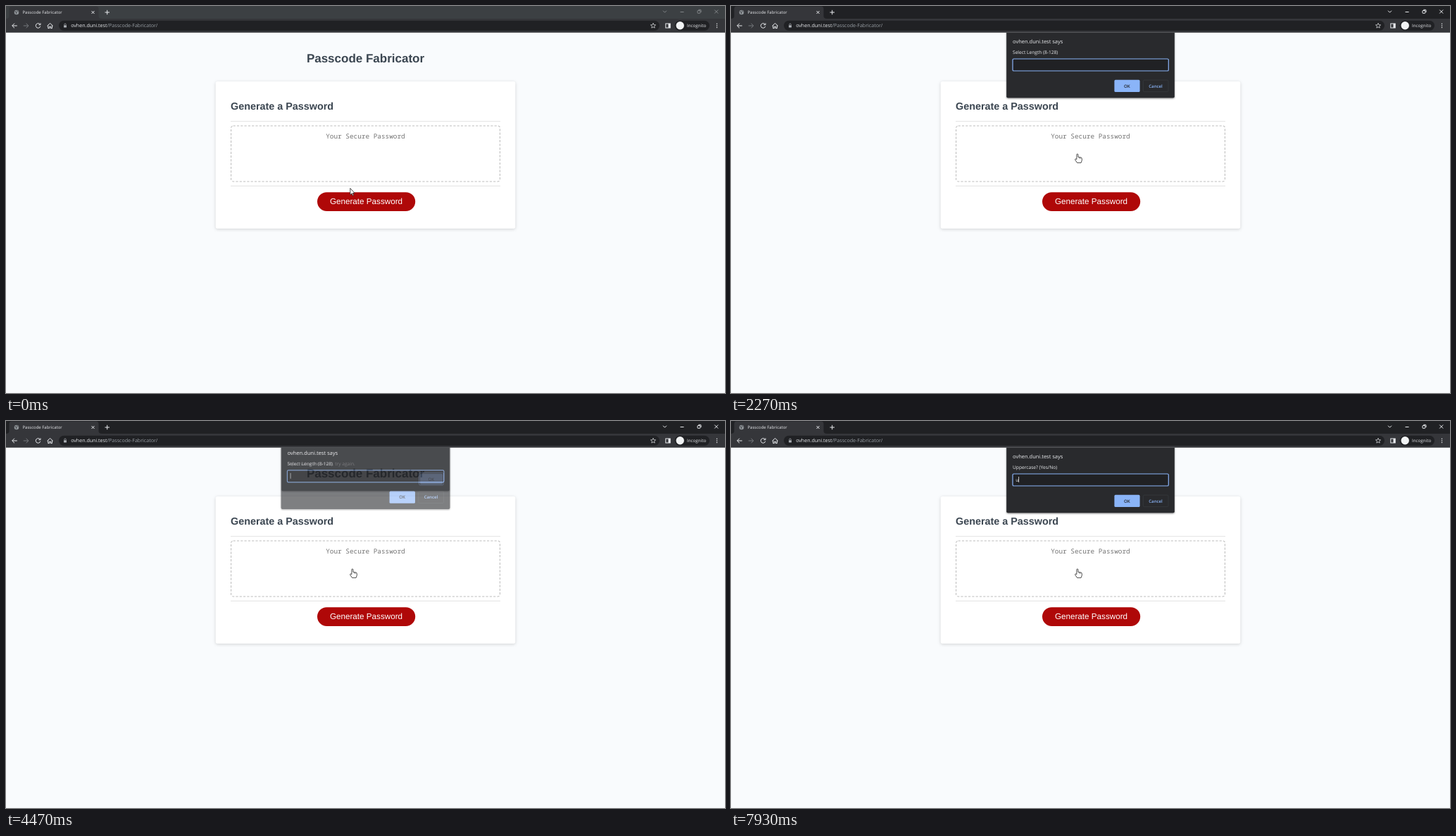
Write an HTML page that moves like this. It is 1021x549 px and loops after 8 s.

```html
<!DOCTYPE html>
<html lang="en">
<head>
<meta charset="utf-8">
<title>Passcode Fabricator</title>
<style>
  html, body { margin: 0; width: 100%; height: 100%; overflow: hidden; background: #f9fbfd; }
  svg { display: block; width: 100vw; height: 100vh; }
  text { text-rendering: geometricPrecision; white-space: pre; }
  .ui { font-family: "Open Sans", "Noto Sans", sans-serif; fill: #e8eaed; }
  .page { font-family: "Liberation Sans", Arial, sans-serif; fill: #3b4651; }
  .bold { font-weight: 700; }
  .semi { font-weight: 600; }
  .mid { text-anchor: middle; }
  .mono { font: 9.38px "Noto Sans Mono", "DejaVu Sans Mono", monospace; fill: #757575; }
  .icon { fill: none; stroke: #e8eaed; stroke-width: 1; }
  .card { filter: drop-shadow(0 1px 2px rgba(0, 0, 0, .17)); }
  .panel { filter: drop-shadow(0 1px 1px rgba(0, 0, 0, .5)); }
</style>
</head>
<body>
<svg viewBox="0 0 1021 549" preserveAspectRatio="none">
  <defs>
    <clipPath id="below"><rect y="37.7" width="1021" height="512"/></clipPath>
  </defs>
  <rect width="1021" height="549" fill="#f9fbfd"/>

  <g id="content">
    <text class="page bold mid" x="510.5" y="80" font-size="17">Passcode Fabricator</text>
    <rect class="card" x="297.7" y="107" width="425.6" height="208.7" rx="2.6" fill="#fff"/>
    <text class="page bold" x="319" y="147" font-size="14.36">Generate a Password</text>
    <path d="M319 163.7H702M319 255.3H702" stroke="#e2e2e2"/>
    <rect x="319.6" y="170" width="381.8" height="79" rx="3" fill="none"
      stroke="#bdbdbd" stroke-width="1.06" stroke-dasharray="3.2 2.1"/>
    <text class="mono mid" x="510.5" y="188.2">Your Secure Password</text>
    <rect x="442" y="264.2" width="139.2" height="26.8" rx="13.4" fill="#af0808"/>
    <text class="page mid" x="511.5" y="281.3" font-size="11.68" style="fill:#fff">Generate Password</text>
  </g>

  <g id="browser">
    <rect id="frame" width="1021" height="19"/>
    <path d="M0 18Q4.500 18 4.500 14V4Q4.500 .5 8 .5H128Q131.500 .5 131.500 4V14Q131.500 18 136 18H1021V37.700H0Z" fill="#35363a"/>
    <circle cx="15" cy="9" r="3.300" fill="#8f9498"/>
    <path d="M12.600 7.600L15 8.600 14.400 11M15.500 6.300L17.600 8.400" fill="none" stroke="#35363a" stroke-width=".9"/>
    <text class="ui" x="23.500" y="11.200" font-size="6">Passcode Fabricator</text>
    <path class="icon" d="M121.500 7L125.500 11M125.500 7L121.500 11M140.500 9H147M143.700 5.800V12.200"/>
    <g id="controls" class="icon" stroke-width=".8">
      <path d="M933 6.700L935.500 9.200 938 6.700M957.500 8.500H962.500M1006.200 5.500L1011.200 10.500M1011.200 5.500L1006.200 10.500"/>
      <rect x="982" y="6.500" width="3.800" height="3.800" rx=".5"/>
      <path d="M983.300 5.300H986.200Q987 5.300 987 6.200V9"/>
    </g>
    <rect x="75" y="20.700" width="853" height="14.300" rx="7.150" fill="#202124"/>
    <g class="icon">
      <path d="M15.800 28H8.800M12 24.700L8.700 28 12 31.300"/>
      <path d="M24.800 28H31.800M28.600 24.700L31.900 28 28.600 31.300" stroke="#75787c"/>
      <path d="M48.300 26A3.300 3.300 0 1 0 48.800 28.800M49 24.400V26.700H46.500"/>
      <path d="M58.500 28.300L62.600 24.500 66.700 28.300M59.800 27.500V31.600H61.700V29.200H63.500V31.600H65.400V27.500"/>
      <path d="M82.700 27.200V26.300A1.300 1.300 0 0 1 85.300 26.300V27.200" stroke="#a9adb2" stroke-width=".7"/>
      <path d="M919 24.300L920 26.700 922.600 26.900 920.600 28.600 921.200 31.100 919 29.800 916.800 31.100 917.400 28.600 915.400 26.900 918 26.700Z" stroke-width=".7"/>
      <rect x="936.800" y="25" width="6.400" height="6"/>
    </g>
    <rect x="82" y="27.200" width="4" height="3.400" rx=".5" fill="#a9adb2"/>
    <text class="ui" x="92.200" y="30.400" font-size="7.090">ovhen.duni.test<tspan fill="#9aa0a6">/Passcode-Fabricator/</tspan></text>
    <rect x="940.500" y="25" width="2.700" height="6" fill="#e8eaed"/>
    <rect x="949.500" y="20.700" width="49.500" height="14.300" rx="7.150" fill="#202124"/>
    <circle cx="957.200" cy="27.800" r="5.700" fill="#f1f3f4"/>
    <text class="ui" x="967" y="30.200" font-size="6.250">Incognito</text>
    <path d="M1009.500 25.200V31.500" stroke="#e8eaed" stroke-width="1.500" stroke-linecap="round" stroke-dasharray="0 2.700"/>
  </g>

  <g id="dialogs" clip-path="url(#below)"></g>

  <g id="cursor" fill="#fff" stroke="#222" stroke-width=".8" stroke-linejoin="round">
    <path id="arrow" d="M0 0V9.300L2.100 7.400 3.500 10.500 4.900 9.900 3.500 6.900H6.300Z"/>
    <g id="hand">
      <path d="M-1 7.600V1Q-1 0 0 0T1 1V4.300L5 5Q6.400 5.300 6.400 6.600V9L5.200 12.500H-.4L-3.100 8.400Q-3.500 6.800 -2.300 7Z"/>
      <path d="M2.700 5V7M4.500 5.300V7" stroke-width=".5"/>
    </g>
  </g>
</svg>

<script>
const LOOP = 8000;
const TICK = 1000 / 15;
const ACTIVATE = 7;
const TEXT_X = 404.2;
const HAND_FROM = 2;

// Dialog shift and opacity, one entry per tick
const OPENING = [[-9, .12], [-5.2, .6], [-2.1, .96], [0, 1]];
const CLOSING = [[-2, .9], [-5.5, .6], [-8, .18], [-9, 0]];

// "blink" lists the ticks at which the caret toggles, starting from visible
const dialogs = [
  { open: 9, close: 47, label: 'Select Length (8-128)',
    typed: [[0, ''], [36, 'w']], blink: [17, 25, 34, 36, 44] },
  { open: 48, close: 66, label: 'input value incorrect. try again.' },
  { open: 66, close: 93, label: 'Select Length (8-128)',
    typed: [[0, ''], [79, '1'], [81, '12']], blink: [74, 79, 89] },
  { open: 93, close: Infinity, label: 'Uppercase? (Yes/No)',
    typed: [[0, ''], [119, 'u']], blink: [101, 110, 117, 119] }
];

const pointer = [
  [0, 488.8, 258.5], [1, 491, 262.5], [2, 498, 272], [3, 501.4, 276.3],
  [16, 501, 270.4], [20, 499, 260], [21, 496, 238], [22, 493, 218], [23, 491.9, 209.9]
];

const byId = id => document.getElementById(id);
const held = (steps, tick) => steps.filter(step => step[0] <= tick).pop();
const label = (cls, x, y, size, text, fill = '#e8eaed') =>
  `<text class="ui ${cls}" x="${x}" y="${y}" font-size="${size}" style="fill:${fill}">${text}</text>`;
const box = (x, y, w, h, attrs) =>
  `<rect x="${x}" y="${y}" width="${w}" height="${h}" rx="1.6" ${attrs}/>`;

const promptBody = () =>
  box(400, 75, 221.3, 17, 'fill="#202124" stroke="#8ab4f8" stroke-width="1.2"') +
  `<text class="ui entry" x="${TEXT_X}" y="86" font-size="6.6"></text>` +
  '<rect class="caret" y="79" width=".8" height="8" fill="#e8eaed"/>' +
  box(544.4, 104.8, 36.2, 17.2, 'fill="#8ab4f8"') +
  label('semi mid', 562.4, 115.5, 6.1, 'OK', '#202124') +
  box(585.3, 105.1, 35.7, 16.6, 'fill="none" stroke="#3c4043" stroke-width=".6"') +
  label('semi mid', 603, 115.5, 6.1, 'Cancel', '#8ab4f8');

const alertBody = () =>
  box(586.5, 79, 34.8, 17.4, 'fill="#292a2d" stroke="#8ab4f8"') +
  box(587.7, 80.2, 32.4, 15, 'fill="#8ab4f8"') +
  label('mid', 603.8, 90, 6.1, 'OK', '#202124');

for (const dialog of dialogs) {
  const node = document.createElementNS('http://www.w3.org/2000/svg', 'g');
  node.innerHTML =
    `<rect class="panel" x="391.2" y="28" width="238.6" height="${dialog.typed ? 102.3 : 76.8}" rx="2" fill="#292a2d"/>` +
    label('', 400, 53, 7.5, 'ovhen.duni.test says') +
    label('', 400, 68.2, 6.65, dialog.label) +
    (dialog.typed ? promptBody() : alertBody());
  dialog.node = byId('dialogs').appendChild(node);
  dialog.entry = node.querySelector('.entry');
  dialog.caret = node.querySelector('.caret');
}

function drawDialog(dialog, tick) {
  const visible = tick >= dialog.open && tick < dialog.close + 3;
  dialog.node.style.display = visible ? '' : 'none';
  if (!visible) return;

  const closing = tick >= dialog.close;
  const [shift, opacity] = closing
    ? CLOSING[tick - dialog.close]
    : OPENING[Math.min(tick - dialog.open, 3)];
  const stretch = closing ? 1 : 1 - shift * .001;
  dialog.node.setAttribute('opacity', opacity);
  dialog.node.setAttribute('transform',
    `translate(510.5 ${shift}) scale(${stretch} 1) translate(-510.5 0)`);

  if (!dialog.typed) return;
  const text = held(dialog.typed, tick)[1];
  const toggles = dialog.blink.filter(at => at <= tick).length;
  dialog.entry.textContent = text;
  dialog.caret.setAttribute('x', TEXT_X + (text ? dialog.entry.getComputedTextLength() : 0));
  dialog.caret.style.display = toggles % 2 ? 'none' : '';
}

function draw(tick) {
  const active = tick >= ACTIVATE;
  byId('frame').setAttribute('fill', active ? '#202124' : '#3c4043');
  byId('controls').setAttribute('opacity', active ? 1 : .4);

  dialogs.forEach(dialog => drawDialog(dialog, tick));

  const [, x, y] = held(pointer, tick);
  byId('cursor').setAttribute('transform', `translate(${x} ${y})`);
  byId('arrow').style.display = tick < HAND_FROM ? '' : 'none';
  byId('hand').style.display = tick < HAND_FROM ? 'none' : '';
}

const start = performance.now();
function loop() {
  const time = (performance.now() - start) % LOOP;
  draw(Math.min(119, Math.floor((time + 4) / TICK)));
  requestAnimationFrame(loop);
}
loop();
</script>
</body>
</html>
```
